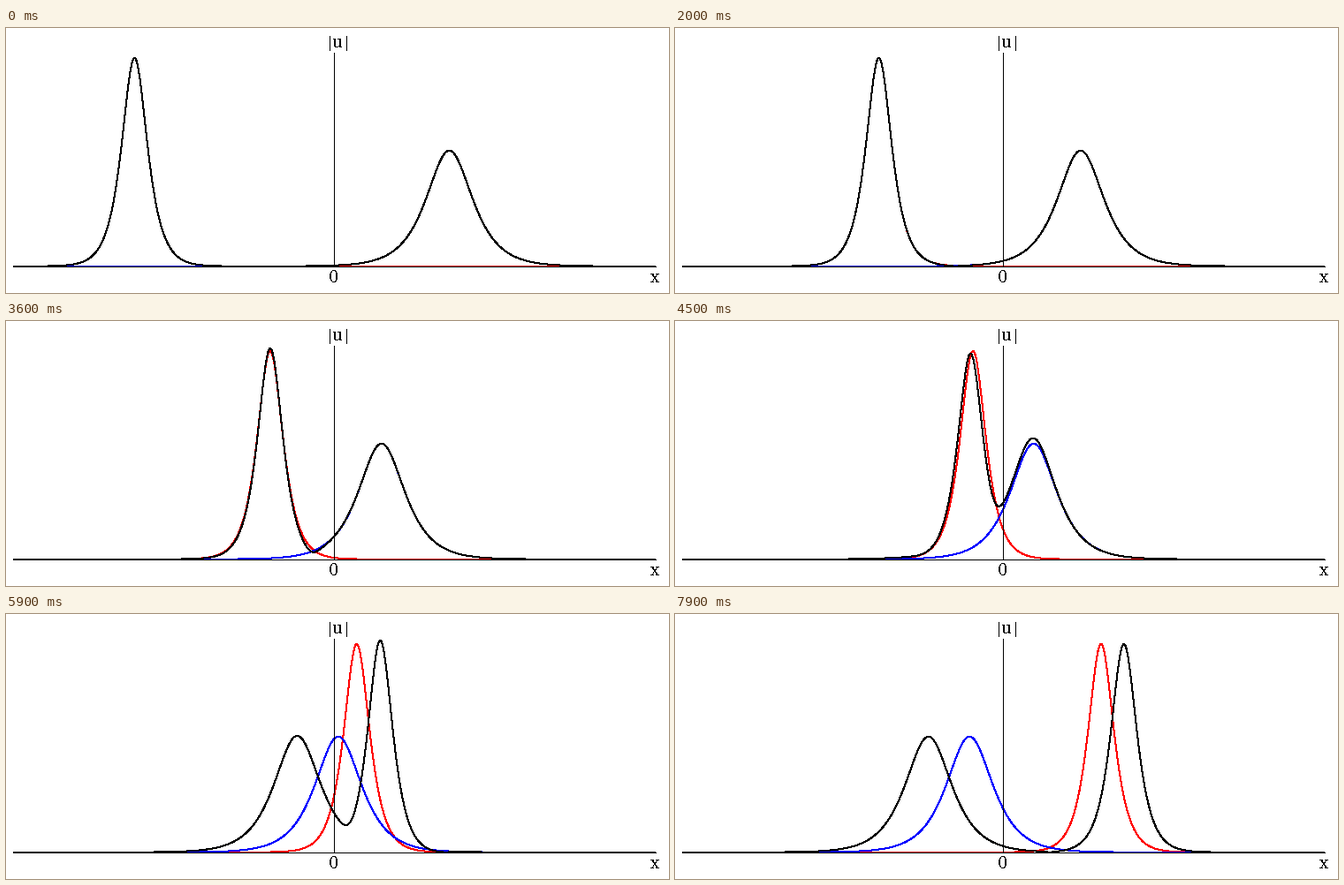
A matplotlib script that plays this animation: 750 by 300 pixels, repeating every 8000 ms.

```python
import numpy as np
import matplotlib.pyplot as plt
from matplotlib.animation import FuncAnimation

W, H, DPI = 750, 300, 100
FRAMES, INTERVAL = 80, 100
PX = 72 / DPI  # points per pixel

plt.rcParams.update({
    "font.family": "DejaVu Serif",
    "text.antialiased": False,
    "lines.antialiased": False,
    "lines.linewidth": PX,
    "lines.solid_capstyle": "butt",
    "path.simplify": False,
    "toolbar": "None",
})

LEFT, RIGHT, ORIGIN, BASE = 8, 735, 371, 269.75
UNIT = 131      # pixels per unit of amplitude
WIDTH = 23.3    # pixels per unit of length
TALL, LOW = 1.8, 1.0   # soliton amplitudes
K = 0.7                # difference of the wave numbers
x = np.linspace(LEFT, RIGHT, 2 * (RIGHT - LEFT) + 1)

# Interaction coefficients of the two-soliton solution
diff = TALL - LOW + 1j * K
total = TALL + LOW + 1j * K
A = (diff / total.conjugate()) ** 2
B = (diff / total) ** 2
CROSS = 4 * TALL * LOW / diff.conjugate() ** 2


def centres(t):
    return 145.4 + 4.26 * t, 501.5 - 2.13 * t


def single(amp, centre):
    return amp / np.cosh(amp * (x - centre) / WIDTH)


def collision(t):
    """Modulus of the interacting pair."""
    c1, c2 = centres(t)
    phase = -1.72 + K * (x - 366.5) / WIDTH + 0.006 * (t - 45)
    z1 = np.exp(TALL * (x - c1) / WIDTH + 1j * phase)
    z2 = np.exp(LOW * (x - c2) / WIDTH)
    m1, m2 = abs(z1) ** 2, z2 ** 2
    a2 = abs(A) ** 2
    f = 1 + m1 + m2 / a2 + m1 * m2 + 2 * (CROSS * z1 * z2).real
    g = 2 * TALL * z1 * (1 + m2 * B / a2) + 2 * LOW * z2 * (1 / A + m1)
    return abs(g / f)


fig = plt.figure(figsize=(W / DPI, H / DPI), dpi=DPI, facecolor="white")
ax = fig.add_axes([0, 0, 1, 1])
ax.set(xlim=(0, W), ylim=(H, 0))
ax.axis("off")


def curve(color, z):
    return ax.plot([], [], color=color, zorder=z, snap=False)[0]


def rule(xs, ys):
    ax.plot(xs, ys, color="black", zorder=5, snap=True)


def label(px, baseline, text):
    ax.text(px, baseline, text, size=18 * PX, ha="center", va="baseline", color="black")


red, blue, black = curve("#ff0000", 2), curve("#0000ff", 3), curve("black", 4)
rule([LEFT, RIGHT], [270, 270])
rule([ORIGIN, ORIGIN], [28, 270])
for bar in (366, 385):
    rule([bar, bar], [9, 25])
label(375.5, 22.5, "u")
label(371, 288.5, "0")
label(733.5, 288.5, "x")


def draw(t):
    c1, c2 = centres(t)
    shapes = single(TALL, c1), single(LOW, c2), collision(t)
    for line, u in zip((red, blue, black), shapes):
        line.set_data(x, BASE - UNIT * u)
    return red, blue, black


anim = FuncAnimation(fig, draw, frames=FRAMES, interval=INTERVAL, repeat=True, repeat_delay=0)
plt.show()
```
